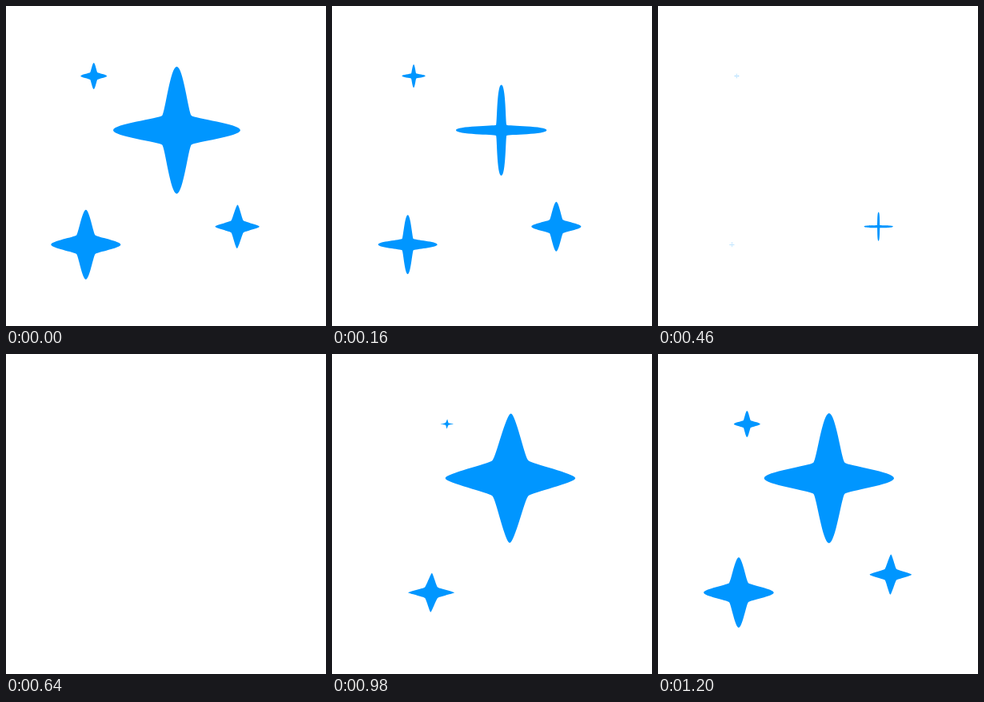
Write an HTML page that moves like this. It is 400 px wide and 400 px high and loops after 1220 ms.

```html
<!DOCTYPE html>
<html lang="en">
<head>
<meta charset="utf-8">
<title>Twinkling stars</title>
<style>
  html, body { margin: 0; width: 100%; height: 100%; overflow: hidden; background: #fff; }
  svg { display: block; width: 100%; height: 100%; fill: #0096ff; }
</style>
</head>
<body>
<svg id="sky" viewBox="0 0 400 400"></svg>
<script>
const LOOP = 1220, STEP = 20, LIFE = 833, PEAK = 0.36;

// x is where the star vanishes; drift scales its slide from the right
const stars = [
  { x: 210.8, y: 155.3, radius: 86.6, drift: 34, start: 767 },
  { x: 92, y: 298.2, radius: 44, drift: 52, start: 867 },
  { x: 98, y: 87.5, radius: 16.5, drift: 63, start: 900 },
  { x: 275, y: 275.7, radius: 31.3, drift: 34, start: 1034 }
];

// Shape of a star of radius 1 at life p, from 0 to 1
function poseAt(p) {
  const rise = Math.min(p / PEAK, 1);
  const fall = Math.max((p - PEAK) / (1 - PEAK), 0);
  const w = 1 - (1 - rise) ** 2.25 - fall ** 2;
  const ratio = 1 - (1 - rise) ** 4;
  const fatness = 0.275 * Math.min(3 * rise, 1) * Math.cos(fall * Math.PI / 2) ** 1.7;
  return {
    w, h: w * ratio,
    n: w * fatness, m: w * ratio * fatness,
    round: 0.1 * rise,
    skew: 0.028 * (1 - rise),
    slide: Math.exp(-5.3 * p ** 1.2)
  };
}

function starPath(star, p) {
  const { w, h, n, m, round, skew, slide } = poseAt(p);
  const g = 0.2 * n;
  const cx = star.x + slide * star.drift;
  const at = (x, y) =>
    (cx + x * star.radius).toFixed(2) + " " + (star.y + y * star.radius).toFixed(2);
  // Top tip, notch, right tip, notch, bottom tip; mirrored for the left side
  const half = [
    [skew + round * w, -h], [n - g, -m - g], [n, -m],
    [n + g, -m + g], [w, -round * h], [w, 0],
    [w, round * h], [n + g, m - g], [n, m],
    [n - g, m + g], [-skew + round * w, h], [-skew, h]
  ];
  const curve = sign => half.map(([x, y]) => at(sign * x, sign * y)).join(" ");
  return `M${at(skew, -h)}C${curve(1)} ${curve(-1)}Z`;
}

const sky = document.getElementById("sky");
for (const star of stars) {
  star.path = document.createElementNS("http://www.w3.org/2000/svg", "path");
  sky.append(star.path);
}

const begin = performance.now();
function draw() {
  const time = Math.floor((performance.now() - begin) % LOOP / STEP) * STEP;
  for (const star of stars) {
    const p = (time - star.start + LOOP) % LOOP / LIFE;
    star.path.setAttribute("d", p < 0.99 ? starPath(star, p) : "");
  }
  requestAnimationFrame(draw);
}
draw();
</script>
</body>
</html>
```
